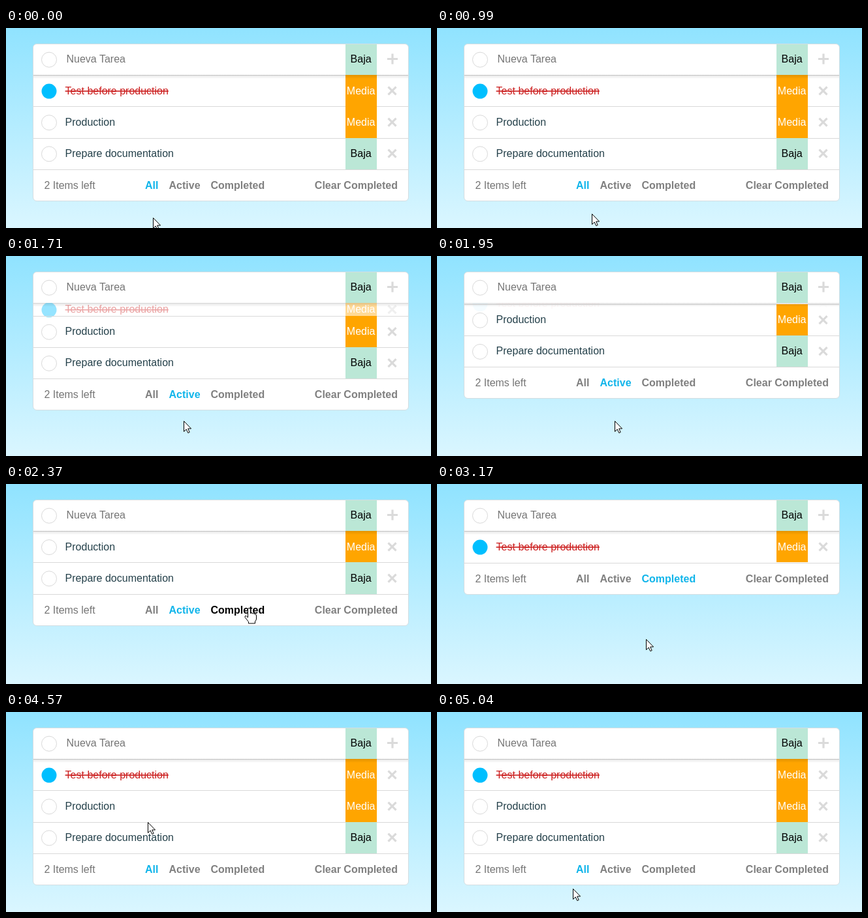
Animation of 651x307 px, one loop 5550 ms. Source, as an HTML page:

```html
<!DOCTYPE html>
<html lang="es">
<head>
<meta charset="utf-8">
<title>Tareas</title>
<style>
  html, body { margin: 0; width: 100%; height: 100%; overflow: hidden; }
  body { background: linear-gradient(#90e3ff, #daf6ff); }
  svg { display: block; width: 651px; height: 307px; }
  text { font: 16px "Liberation Sans", Arial, sans-serif; fill: #24404a; }
  .muted { fill: #757575; }
  .done { fill: #cc1f1f; text-decoration: line-through; }
  .badge { text-anchor: middle; fill: #000; }
  .badge.light { fill: #fff; }
  .link { font-weight: bold; fill: #808080; }
  .link.active { fill: #11b5ea; }
  .link.hover { fill: #000; }
  .line { fill: #d9d9d9; }
  .mark { stroke: #dadada; stroke-width: 3.2; fill: none; }
  .cursor { fill: #fff; stroke: #000; stroke-width: 1; stroke-linejoin: round; }
</style>
</head>
<body>
<svg viewBox="0 0 651 307">
  <defs>
    <linearGradient id="shade" x2="0" y2="1">
      <stop stop-color="#000" stop-opacity=".11"/>
      <stop offset="1" stop-color="#000" stop-opacity="0"/>
    </linearGradient>
  </defs>
  <rect id="card" x="41.5" y="24.5" width="575" rx="5.5" fill="#fff"/>
  <g id="footer">
    <rect class="line" x="42" width="574" height="1"/>
    <text class="muted" x="58.4" y="30">2 Items left</text>
    <text class="link" x="213" y="30">All</text>
    <text class="link" x="249.5" y="30">Active</text>
    <text class="link" x="313.5" y="30">Completed</text>
    <text class="link" x="600" y="30" text-anchor="end">Clear Completed</text>
  </g>
  <g id="rows"></g>
  <g id="header">
    <rect x="42" y="72" width="574" height="6" fill="url(#shade)"/>
    <path d="M42 72V30a5 5 0 0 1 5-5H611a5 5 0 0 1 5 5V72Z" fill="#fff"/>
  </g>
  <rect id="outline" x="41.5" y="24.5" width="575" rx="5.5" fill="none" stroke="#d3dde1"/>
  <path id="arrow" class="cursor" d="M.5.5V16.5L4.2 13 6.8 18.6 9.2 17.5 6.7 12H11.6Z"/>
  <path id="hand" class="cursor" d="M-2.5 15V2.5Q-2.500.5-.5.5T1.500 2.500V8.500Q3.500 7 5 9Q7 7.800 8.300 10Q10.500 9.500 10.500 12V17Q10.500 19 8.500 21V24H-1.500V21.500L-7 14.500Q-7.500 12-5 12.500Z"/>
</svg>
<script>
const LOOP = 5550, ROW = 48.15, TOP = 72.3;
const $ = id => document.getElementById(id);

// The picture holds still between these times.
const run = (from, to, n) => Array.from({ length: n }, (_, i) => from + (to - from) * i / (n - 1));
const ticks = [0, 150, 990, 1170, 1240, ...run(1540, 2030, 7), ...run(2120, 2370, 4),
  2860, 3170, ...run(3420, 3890, 7), 3980, 4220, ...run(4520, 5040, 8)];

const path = [[0, 225, 291], [150, 224, 293], [990, 237, 285], [1170, 254, 270],
  [1240, 272, 247], [1540, 272, 247], [1620, 272, 253], [2030, 272, 253],
  [2370, 373, 190], [2860, 373, 190], [3170, 320, 238], [3340, 320, 238],
  [3890, 221, 155], [3980, 218, 150], [4220, 218, 153], [4440, 218, 153], [5040, 208, 271]];

// Each filter link: hovered, then clicked.
const clicks = [{ link: 1, hover: 1240, at: 1540 }, { link: 2, hover: 2370, at: 2860 },
  { link: 0, hover: 3980, at: 4220 }];
const handTimes = [[1240, 1620], [2370, 3170], [3980, 4220]];

const rowArt = (label, level, { kind = '', mark = 'cross', x = 90.6 } = {}) => {
  const medium = level === 'Media';
  const circle = kind === 'done' ? 'fill="#00bfff"' : 'fill="#fff" stroke="#d9d9d9"';
  const d = mark === 'plus' ? 'M584-.5H600M592-8.500V7.500' : 'M585.500-6L597.500 6M597.500-6L585.500 6';
  return `<circle cx="66" cy=".7" r="11.5" ${circle}/>
    <text class="${kind}" x="${x}" y="5.2">${label}</text>
    <rect x="520" y="${-ROW / 2}" width="48" height="${ROW}" shape-rendering="crispEdges"
      fill="${medium ? '#ffa500' : '#bbe7d6'}"/>
    <text class="badge ${medium ? 'light' : ''}" x="543.6" y="5.2">${level}</text>
    <path class="mark" d="${d}"/>`;
};

$('header').innerHTML +=
  `<g transform="translate(0 48)">${rowArt('Nueva Tarea', 'Baja', { kind: 'muted', mark: 'plus', x: 92.5 })}</g>`;

const rows = [['Test before production', 'Media', { kind: 'done' }],
  ['Production', 'Media'], ['Prepare documentation', 'Baja']].map(args => {
  const group = document.createElementNS('http://www.w3.org/2000/svg', 'g');
  group.innerHTML = `<rect class="line" x="42" width="574" height="1"/><g>${rowArt(...args)}</g>`;
  $('rows').append(group);
  return { group, line: group.firstChild, body: group.lastChild };
});
const links = [...document.querySelectorAll('.link')];

// Spring curves; s is in seconds.
const leave = s => s <= 0 ? 1 : (1 + 13 * s) * Math.exp(-13 * s);
const enter = s => 1 - Math.exp(-7 * s) * (Math.cos(8.42 * s) + 0.831 * Math.sin(8.42 * s));

// Returns [height share, opacity] for the done row and the open rows.
const fadeIn = s => [enter(s), Math.min(1, 1.8 * enter(s))];
const fadeOut = s => [leave(s), leave(s)];
const late = (t, start, lead) => (lead + 2 * (t - start)) / 1000;
const doneState = t => t < 2860 ? fadeOut((t - 1550) / 1000) : fadeIn(late(t, 2860, 10));
const openState = t => t < 2860 ? [1, 1]
  : t < 4220 ? fadeOut(late(t, 2860, 10)) : fadeIn(late(t, 4220, 37));

function cursorAt(t) {
  const i = path.findIndex(p => p[0] > t);
  if (i < 0) return path[path.length - 1].slice(1);
  const [t0, x0, y0] = path[i - 1], [t1, x1, y1] = path[i];
  const k = (t - t0) / (t1 - t0);
  return [Math.round(x0 + (x1 - x0) * k), Math.round(y0 + (y1 - y0) * k)];
}

function draw(t) {
  let y = TOP;
  rows.forEach(({ group, line, body }, i) => {
    const [share, opacity] = i ? openState(t) : doneState(t);
    const height = ROW * share;
    group.setAttribute('opacity', opacity < 0.006 ? 0 : opacity);
    line.setAttribute('y', Math.round(y));
    body.setAttribute('transform', `translate(0 ${y + height / 2})`);
    y += height;
  });
  y = Math.round(y);
  $('footer').setAttribute('transform', `translate(0 ${y})`);
  for (const id of ['card', 'outline']) $(id).setAttribute('height', y + 48 - 24);

  const active = clicks.reduce((now, c) => t >= c.at ? c.link : now, 0);
  const hovered = clicks.find(c => t >= c.hover && t < c.at);
  links.forEach((link, i) => {
    link.classList.toggle('active', i === active);
    link.classList.toggle('hover', !!hovered && i === hovered.link);
  });

  const isHand = handTimes.some(([a, b]) => t >= a && t < b);
  for (const id of ['arrow', 'hand']) {
    $(id).setAttribute('transform', `translate(${cursorAt(t).join(' ')})`);
    $(id).style.display = (id === 'hand') === isHand ? '' : 'none';
  }
}

const start = performance.now();
function frame() {
  const t = (performance.now() - start) % LOOP;
  draw(ticks.filter(tick => tick <= t + 0.5).pop());
  requestAnimationFrame(frame);
}
frame();
</script>
</body>
</html>
```
